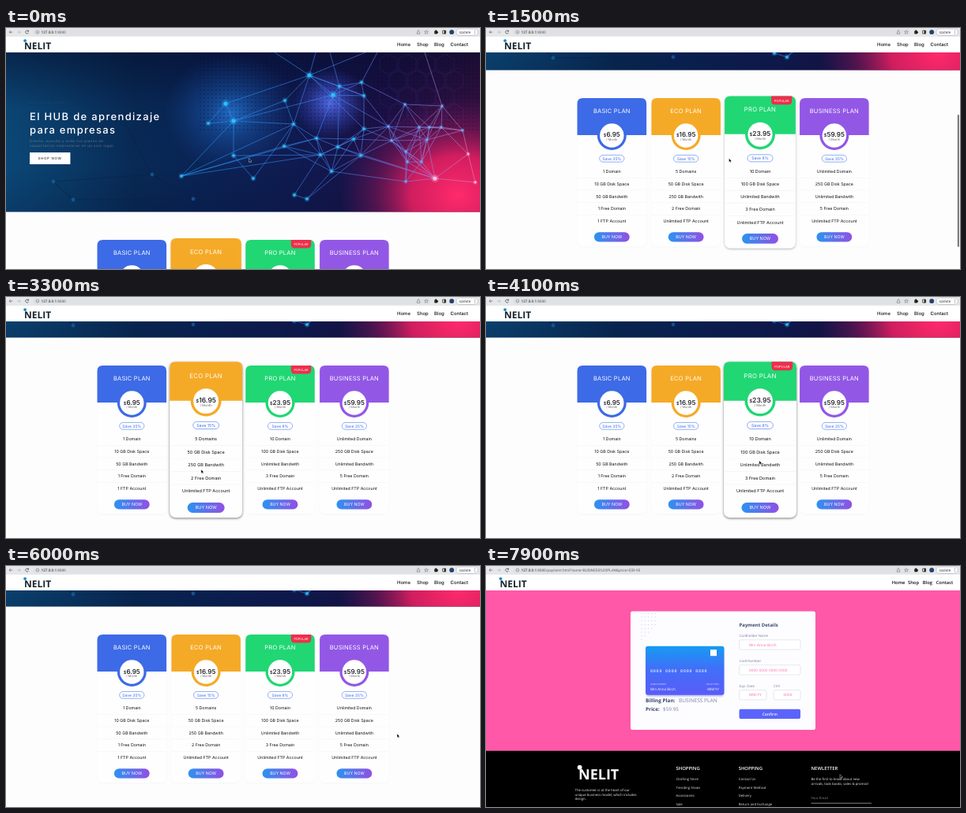
An HTML page for the animation above (8000 ms loop, 600 by 306 pixels).

```html
<!DOCTYPE html>
<html lang="es">
<head>
<meta charset="utf-8">
<title>Plans</title>
<style>
html, body { margin: 0; width: 100%; height: 100%; overflow: hidden; background: #fdfdfe; }
svg { display: block; width: 600px; height: 306px; text-rendering: geometricPrecision; }
text { font-family: Inter, sans-serif; white-space: pre; }
.open text, text.open { font-family: "Open Sans", sans-serif; }
text.url { font-family: Roboto, sans-serif; }
text.mono { font-family: "DejaVu Sans Mono", monospace; }
</style>
</head>
<body>
<svg id="stage" viewBox="0 0 600 306">
<defs>
  <linearGradient id="sky">
    <stop offset="0" stop-color="#0b4877"/><stop offset=".12" stop-color="#0a3c69"/>
    <stop offset=".27" stop-color="#082a55"/><stop offset=".42" stop-color="#0a2355"/>
    <stop offset=".62" stop-color="#101a50"/><stop offset=".8" stop-color="#1c1045"/>
    <stop offset="1" stop-color="#34103f"/>
  </linearGradient>
  <linearGradient id="shade" x2="0" y2="1">
    <stop offset="0" stop-color="#050b2a" stop-opacity=".55"/><stop offset=".35" stop-color="#050b2a" stop-opacity=".05"/>
    <stop offset=".7" stop-color="#050b2a" stop-opacity="0"/><stop offset="1" stop-color="#050b2a" stop-opacity=".2"/>
  </linearGradient>
  <radialGradient id="glow"><stop offset="0" stop-color="#2a86ea" stop-opacity=".75"/><stop offset=".4" stop-color="#1c62bc" stop-opacity=".45"/><stop offset="1" stop-color="#164a98" stop-opacity="0"/></radialGradient>
  <radialGradient id="violet"><stop offset="0" stop-color="#5a78ff" stop-opacity=".85"/><stop offset="1" stop-color="#3440c0" stop-opacity="0"/></radialGradient>
  <radialGradient id="hot"><stop offset="0" stop-color="#ff2a6c"/><stop offset=".4" stop-color="#ee2064" stop-opacity=".85"/><stop offset=".7" stop-color="#a81a62" stop-opacity=".4"/><stop offset="1" stop-color="#801a68" stop-opacity="0"/></radialGradient>
  <linearGradient id="wire" gradientUnits="userSpaceOnUse" x1="215" x2="600">
    <stop offset="0" stop-color="#1f9cf8"/><stop offset=".5" stop-color="#3f8dff"/>
    <stop offset=".75" stop-color="#7584f5"/><stop offset="1" stop-color="#f08cc4"/>
  </linearGradient>
  <linearGradient id="buy"><stop offset="0" stop-color="#2b93f0"/><stop offset="1" stop-color="#9150e4"/></linearGradient>
  <linearGradient id="bank" x2="0" y2="1"><stop offset="0" stop-color="#159cf2"/><stop offset=".45" stop-color="#4070f8"/><stop offset="1" stop-color="#5a5cf8"/></linearGradient>
  <filter id="blur" x="-20%" y="-20%" width="140%" height="140%"><feGaussianBlur stdDeviation="1.3"/></filter>
  <clipPath id="heroBox"><rect y="31" width="600" height="202.5"/></clipPath>
</defs>
</svg>
<script>
const stage = document.getElementById('stage');
const $ = id => document.getElementById(id);

const text = (x, y, str, size, fill = '#111', more = '') =>
  `<text x="${x}" y="${y}" font-size="${size}" fill="${fill}" ${more}>${str}</text>`;
const rect = (x, y, w, h, fill, r = 0, more = '') =>
  `<rect x="${x}" y="${y}" width="${w}" height="${h}" rx="${r}" fill="${fill}" ${more}/>`;
const dot = (x, y, r, fill, more = '') => `<circle cx="${x}" cy="${y}" r="${r}" fill="${fill}" ${more}/>`;
const oval = (x, y, rx, ry, fill) => `<ellipse cx="${x}" cy="${y}" rx="${rx}" ry="${ry}" fill="${fill}"/>`;
const path = (d, stroke, width, more = '') =>
  `<path d="${d}" fill="none" stroke="${stroke}" stroke-width="${width}" ${more}/>`;
const mid = 'text-anchor="middle"';
const bold = 'font-weight="700"';
const spaced = n => `letter-spacing="${n}"`;

const BRAND = 'NELIT', HOLDER = 'Mrs Anna Birch';

// ---------- hero ----------
// The first nodes are the large ones.
const nodes = [[384,60],[278,96],[288,118],[414,85],[543,191],
  [256,121],[353,92],[364,122],[352,150],[222,188],[288,162],[313,191],[422,74],[450,69],[453,86],
  [393,140],[398,161],[412,182],[365,212],[381,217],[420,151],[440,141],[453,128],[449,162],
  [484,125],[488,143],[506,157],[508,170],[526,170],[506,195],[523,126],[536,126],[551,126],
  [533,142],[578,130],[585,160],[594,196],[505,97],[552,99]];
const longWires = [[9,2],[9,7],[9,15],[9,16],[9,8],[1,0],[2,6],[2,7],[2,3],[0,7],[0,14],[0,22],[3,15],
  [3,24],[12,20],[8,17],[18,16],[19,23],[4,23],[4,20],[4,25],[4,35],[10,16],[11,7],[13,37],[17,29]];
const tops = [[384,60,392],[384,60,340],[384,60,455],[422,74,410],[450,69,470],[552,99,530]];

function network() {
  let d = '';
  const link = (a, b) => d += `M${a}L${b}`;
  nodes.forEach((a, i) => nodes.slice(i + 1).forEach(b => {
    if (Math.hypot(a[0] - b[0], a[1] - b[1]) < 52) link(a, b);
  }));
  longWires.forEach(([i, j]) => link(nodes[i], nodes[j]));
  tops.forEach(([x, y, top]) => link([x, y], [top, 31]));
  return path(d, 'url(#wire)', .65, 'opacity=".85"') + nodes.map(([x, y], i) => {
    const r = i < 5 ? 2.6 : x > 470 ? 1.4 : 1.8;
    const c = x > 535 && y > 150 ? '#ffc0e0' : x > 470 ? '#5fb0ff' : '#2cc0fc';
    return dot(x, y, r * 1.9, c, 'opacity=".25"') + dot(x, y, r, c);
  }).join('');
}

function texture() {
  let s = '', hex = '';
  for (let y = 34; y < 130; y += 5)
    for (let x = 245; x < 600; x += 5) s += `M${x} ${y}h1.7`;
  for (let row = 0; row < 4; row++)
    for (let col = 0; col < 4; col++) {
      const x = 484 + col * 24 + row % 2 * 12, y = 46 + row * 21;
      hex += `M${x} ${y - 13}l11 6.5v13l-11 6.5l-11 -6.5v-13z`;
    }
  return path(s, '#05092e', 1.7, 'opacity=".35"') + path(hex, '#5a4fb0', .5, 'opacity=".35"');
}

// Dim, out-of-focus threads in the lower left.
const haze = path('M85 218L60 195L185 186L237 217L85 218M185 186L150 120M237 217L288 162', '#0a1f48', 1.2, 'opacity=".45"') +
  [[85, 218], [60, 195], [185, 186], [237, 217]].map(([x, y]) => dot(x, y, 2.4, '#1f6db0', 'opacity=".6"')).join('');

const hero = `<g clip-path="url(#heroBox)">` +
  rect(0, 31, 600, 203, 'url(#sky)') + rect(0, 31, 600, 203, 'url(#shade)') +
  oval(285, 108, 85, 75, 'url(#glow)') + oval(410, 95, 48, 45, 'url(#violet)') +
  oval(572, 212, 150, 125, 'url(#hot)') +
  texture() + haze + network() + '</g>' +
  text(30, 96, 'Bienvenido a ' + BRAND, 4.3, '#1b4770', spaced(.6)) +
  text(30, 117, 'El HUB de aprendizaje', 13, '#fff', 'font-weight="500" ' + spaced(1.33)) +
  text(30, 134, 'para empresas', 13, '#fff', 'font-weight="500" ' + spaced(1.3)) +
  text(30, 145, 'Diseña, ejecuta y mide tus planes de', 4.3, '#6c7086', spaced(.53)) +
  text(30, 151, 'capacitación empresarial en un solo lugar.', 4.3, '#6c7086', spaced(.53)) +
  rect(30, 158, 51.4, 15, '#fff') +
  text(55.5, 167.1, 'SHOP NOW', 4.4, '#111', mid + ' ' + spaced(.7));

// ---------- price cards ----------
const plans = [
  ['BASIC PLAN', '#3d6ae6', '6.95', 35, '1 Domain', '10 GB Disk Space', '50 GB Bandwith', '1 Free Domain', '1 FTP Account'],
  ['ECO PLAN', '#f5aa27', '16.95', 15, '5 Domains', '50 GB Disk Space', '250 GB Bandwith', '2 Free Domain', 'Unlimited FTP Account'],
  ['PRO PLAN', '#20d774', '23.95', 8, '10 Domain', '100 GB Disk Space', 'Unlimited Bandwith', '3 Free Domain', 'Unlimited FTP Account'],
  ['BUSINESS PLAN', '#9357e6', '59.95', 35, 'Unlimited Domain', '250 GB Disk Space', 'Unlimited Bandwith', '5 Free Domain', 'Unlimited FTP Account']];
const cardX = i => 159.3 + i * 93.85;
const CARD_Y = 181.3;

// Each card is drawn around x = 0 and keeps its settled y.
function card([name, color, price, save, ...items], i) {
  return `<g id="card${i}"><g id="shadow${i}">` +
    rect(-43.8, 87.8, 87.6, 188.6, '#444', 7, 'filter="url(#blur)"') + '</g>' +
    rect(-43.8, 87, 87.6, 188.5, '#fefeff', 7) +
    `<path d="M-43.8 134v-40q0 -7 7 -7h73.6q7 0 7 7v40z" fill="${color}"/>` +
    text(0, 106.3, name, 7.5, '#fff', mid + ' ' + spaced(.25)) +
    dot(0, 134.5, 18.5, color) + dot(0, 134.5, 15.2, '#fff') +
    text(0, 136.5, `<tspan font-size="5.6">$</tspan>${price}`, 8.2, '#15151c', mid + ' font-weight="500"') +
    text(0, 141.4, '/ Month', 3.9, '#666', mid) +
    rect(-15.6, 159.4, 31.2, 8.8, '#fff', 4.4, 'stroke="#5f8ef0" stroke-width=".7"') +
    text(0, 165.6, `Save ${save}%`, 5, '#3d6ae6', mid) +
    items.map((s, k) => text(0, 182.2 + k * 15.7, s, 5.3, '#111', mid) +
      (k < 4 ? rect(-43, 188 + k * 15.7, 86, .5, '#f0f0f4') : '')).join('') +
    rect(-22.4, 257.2, 44.8, 12.4, 'url(#buy)', 6.2) +
    text(0, 265.3, 'BUY NOW', 5.3, '#fff', mid) +
    (i == 2 ? '<path d="M13.8 87h25.4v6q0 4.5 -4.5 4.5h-16.4q-4.5 0 -4.5 -4.5z" fill="#ee2f4c"/>' +
      text(26.5, 93.9, 'POPULAR', 3.9, '#fff', mid) : '') + '</g>';
}

// ---------- browser bar and menus ----------
const gray = '#5f6368';
const chrome = rect(0, 0, 600, 11, '#e6e7e9') + rect(34, 1, 504, 8.6, '#dfe1e4', 4.3) +
  path('M8.4 5.2h-4.2m1.8 -1.9l-1.9 1.9l1.9 1.9', gray, .7) +
  path('M14 5.2h4.2m-1.8 -1.9l1.9 1.9l-1.9 1.9', '#b0b3b8', .7) +
  path('M28.3 4a2 2 0 1 0 .2 2M28.5 2.8v1.5h-1.5', '#3c4043', .7) +
  path('M38 5.2a1.9 1.9 0 1 0 3.8 0a1.9 1.9 0 1 0 -3.8 0M39.9 5v1.2', gray, .5) +
  path('M520.3 4.5v3h3.4v-3M522 6v-3.4m-1 1l1 -1l1 1', gray, .5) +
  path('M532 2.8l.7 1.6l1.7 .1l-1.3 1.1l.4 1.7l-1.5 -.9l-1.5 .9l.4 -1.7l-1.3 -1.1l1.7 -.1z', gray, .45) +
  rect(542.3, 3.6, 3.8, 3.8, '#222', .5) + dot(544.2, 3.3, .9, '#222') + dot(546.3, 5.5, .9, '#222') +
  rect(552.6, 3.2, 4, 4, 'none', .4, 'stroke="#222" stroke-width=".7"') + rect(554.6, 3.2, 2, 4, '#222') +
  dot(564.2, 5.2, 2.9, '#27406f') +
  rect(570, 1.1, 27.5, 8.4, '#fff', 4.2, 'stroke="#a9afba" stroke-width=".6"') +
  text(573.5, 6.9, 'Update', 4.6, '#3c4043', 'class="url"') +
  [3.4, 5.3, 7.2].map(y => dot(593.3, y, .5, gray)).join('');

const address = rest => text(44.5, 6.9, `127.0.0.1<tspan fill="#5f6368">${rest}</tspan>`, 4.7, '#202124', 'class="url"');
const logo = (x, y, size, fill, mark) => dot(x + size * .09, y - size * .87, size * .16, mark) +
  text(x, y, BRAND, size, fill, 'class="open" ' + bold);
const menu = (xs, size, more) => ['Home', 'Shop', 'Blog', 'Contact']
  .map((s, i) => text(xs[i], 23.2, s, size, '#111', more)).join('');
const header = rect(0, 11, 600, 20, '#fff');

const shop = '<g id="shop">' + rect(0, 0, 600, 306, '#fdfdfe') + '<g id="page">' + hero +
  '<g transform="translate(0 182)">' + plans.map(card).join('') + '</g></g>' +
  rect(596.8, 60, 2.2, 168, '#7c7c7c', 1.1, 'id="thumb"') +
  header + logo(23, 26.5, 12, '#14242f', '#1c86c8') +
  menu([495, 520, 542, 562.5], 6, 'font-weight="500"') + chrome + address(':8080') + '</g>';

// ---------- payment page ----------
const label = (x, y, s) => text(x, y, s, 4.4, '#717d98');
const field = (x, y, w, s) => rect(x, y, w, 12.3, '#fff', 2, 'stroke="#d3d7e4" stroke-width=".6"') +
  text(x + 12.5, y + 7.8, s, 4.6, '#ff62a8', spaced(.15));
const column = (x, ...items) => text(x, 259.3, 'SHOPPING', 5.9, '#fff', 'font-weight="600"') +
  items.map((s, i) => text(x, 272.3 + i * 10.4, s, 4.3, '#e4e4e4')).join('');
const lines = (x, y, ...rows) => rows.map((s, i) => text(x, y + i * 5.5, s, 4.3, '#eee')).join('');

function dots() {
  let s = '';
  for (let c = 0; c < 5; c++)
    for (let r = 0; r < 8 - c; r++) s += dot(197 + c * 4.3, 60 + r * 4.8, .5, '#b6bcdc');
  return s;
}

const NUMBER = '0000 0000 0000 0000';
const pay = '<g id="pay" class="open">' + rect(0, 31, 600, 204, '#ff58a8') +
  rect(183, 57.5, 234, 150.5, '#fdfdff', 2.5) + dots() +
  rect(203, 104, 97.5, 61.5, '#5a62d8', 3, 'filter="url(#blur)" opacity=".45"') +
  rect(202, 101.7, 99.5, 62, 'url(#bank)', 3) + rect(284, 106.2, 8, 8, '#fff') +
  text(208, 135.2, NUMBER, 5, '#fff', 'class="mono" ' + spaced(.8)) +
  text(208, 150.6, 'CARD HOLDER', 2.9, '#e4e8ff') + text(295, 150.6, 'VALID THRU', 2.9, '#e4e8ff', 'text-anchor="end"') +
  text(208, 158, HOLDER, 4.5, '#fff') + text(295, 158, 'MM/YY', 4.5, '#fff', 'text-anchor="end"') +
  text(202, 173, 'Billing Plan:', 6.4, '#36456c', bold) + text(244, 173, 'BUSINESS PLAN', 6.6, '#7582a4') +
  text(202, 183.8, 'Price:', 6.4, '#36456c', bold) + text(224, 183.8, '$59.95', 6.4, '#7582a4') +
  text(320.5, 76.7, 'Payment Details', 6, '#3b4a6c', bold) +
  label(320.5, 90, 'Cardholder Name') + field(320.5, 93.8, 77.5, HOLDER) +
  label(320.5, 122, 'Card Number') + field(320.5, 125.8, 77.5, NUMBER) +
  label(320.5, 153.8, 'Exp. Date') + field(320.5, 157.6, 34.5, 'MM/YY') +
  label(364, 153.8, 'CVV') + field(364, 157.6, 34, '0000') +
  rect(320.5, 181.7, 77.5, 12.3, '#5a64fb', 2) + text(359.3, 189.6, 'Confirm', 4.9, '#fff', mid + ' font-weight="600"') +
  rect(0, 234.7, 600, 72, '#000') + logo(117, 271.3, 18, '#fff', '#fff') +
  lines(112.5, 286, 'The customer is at the heart of our', 'unique business model, which includes', 'design.') +
  column(240.5, 'Clothing Store', 'Trending Shoes', 'Accessories', 'Sale') +
  column(319.7, 'Contact Us', 'Payment Method', 'Delivery', 'Return and Exchange') +
  text(411.5, 259.3, 'NEWLETTER', 5.9, '#fff', 'font-weight="600"') +
  lines(411.5, 272.3, 'Be the first to know about new', 'arrivals, look books, sales &amp; promos!') +
  text(411.5, 295.5, 'Your Email', 4.3, '#8a8a8a') + rect(411.5, 300.8, 76.5, .6, '#ddd') +
  header + logo(17.5, 26.5, 12, '#14242f', '#1c86c8') +
  menu([513.7, 534, 552.7, 569.7], 5.8, 'font-weight="600"') + chrome +
  address(':8080/payment.html?name=BUSINESS%20PLAN&amp;price=$59.95') + '</g>';

const cursor = '<path id="cursor" d="M0 0v4.8l1.1 -1l.9 1.7l.8 -.4l-.8 -1.6h1.5z" fill="#000" stroke="#fff" stroke-width=".4"/>';
stage.insertAdjacentHTML('beforeend', shop + pay + cursor);

// ---------- motion ----------
const LOOP = 8000, STEP = 100, SCROLL = 182, OPEN_PAY = 7300;
const clamp = p => Math.max(0, Math.min(1, p));
const smooth = p => (p = clamp(p), p * p * (3 - 2 * p));

// Keys are [time, ...values]; values ease from key to key.
function track(keys, t) {
  const n = keys.findIndex(k => k[0] > t);
  if (n < 0) return keys.at(-1).slice(1);
  if (!n) return keys[0].slice(1);
  const a = keys[n - 1], b = keys[n], p = smooth((t - a[0]) / (b[0] - a[0]));
  return a.slice(1).map((v, i) => v + (b[i + 1] - v) * p);
}

const hover = [
  [[2400, 0], [2600, 1], [2900, 1], [3100, 0]],
  [[0, .4], [399, .4], [400, 0], [3000, 0], [3200, 1], [3700, 1], [3900, 0]],
  [[1400, 0], [1600, 1], [2300, 1], [2500, 0], [3800, 0], [4000, 1], [4900, 1], [5100, 0]],
  [[6200, 0], [6400, 1]]];
const pointer = [[0, 307.5, 165.5], [1700, 307.5, 165.5], [2200, 330, 198], [2400, 126, 246], [2700, 140, 238],
  [3300, 247, 219], [3700, 255, 213], [4000, 345, 208], [4700, 360, 203], [5000, 491, 201],
  [6000, 495, 213], [6400, 455, 260], [6900, 449, 265], [7900, 448, 264.5]];

function draw(now) {
  const t = Math.floor(now % LOOP / STEP) * STEP;
  const y = t < 700 ? 0 : SCROLL * smooth((t - 655) / 900);
  $('page').setAttribute('transform', `translate(0 ${-y})`);
  $('thumb').setAttribute('y', 11 + y * .55);
  $('thumb').setAttribute('opacity', t < 700 ? 0 : clamp((2200 - t) / 300));
  hover.forEach((keys, i) => {
    const [h] = track(keys, t);
    $('card' + i).setAttribute('transform',
      `translate(${cardX(i)} ${CARD_Y}) scale(${1 + h * .05}) translate(0 ${-CARD_Y})`);
    $('shadow' + i).setAttribute('opacity', .03 + h * .7);
  });
  const paying = t >= OPEN_PAY;
  $('shop').setAttribute('display', paying ? 'none' : 'inline');
  $('pay').setAttribute('display', paying ? 'inline' : 'none');
  $('cursor').setAttribute('transform', `translate(${track(pointer, t)})`);
}

const start = performance.now();
(function tick() {
  draw(performance.now() - start);
  requestAnimationFrame(tick);
})();
</script>
</body>
</html>
```
